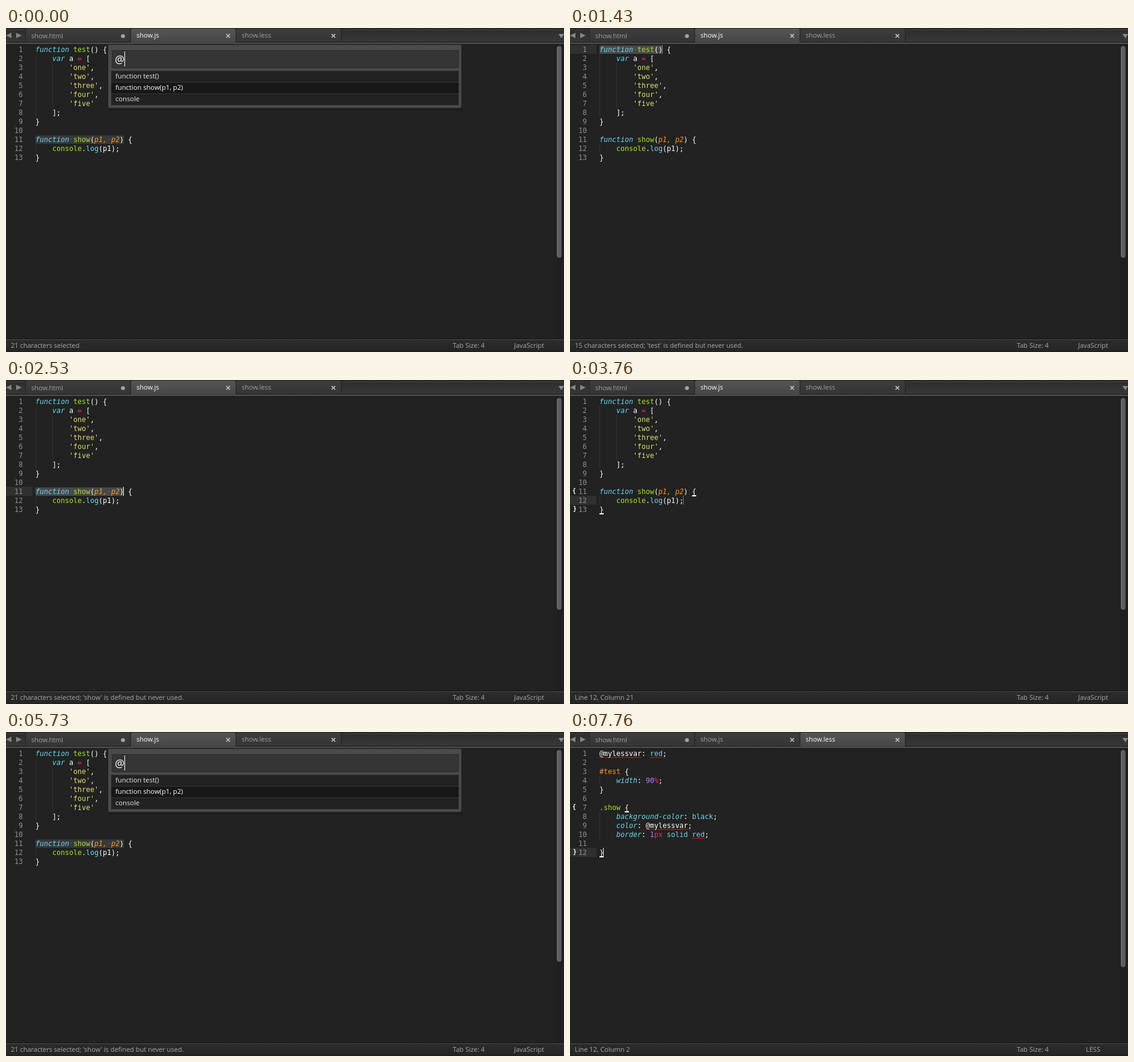
These frames come from a looping animation (928x540 px, 8000 ms). An HTML page:

```html
<!DOCTYPE html>
<html lang="en">
<head>
<meta charset="utf-8">
<title>Go to symbol</title>
<style>
  html, body { margin: 0; width: 100%; height: 100%; overflow: hidden; background: #222; }
  svg { display: block; width: 928px; height: 540px; }
  text { font: 11px "Open Sans", "Noto Sans", sans-serif; white-space: pre; fill: #a8a8a8; }
  text.code { font: 11.63px "DejaVu Sans Mono", "Noto Sans Mono", monospace; }
  text.code.italic { font-style: italic; }
  text.mark { font: bold 10px "DejaVu Sans Mono", "Noto Sans Mono", monospace; fill: #fff; }
  text.symbol { font-size: 11.2px; }
  text.query { font-size: 18px; fill: #fff; }
  rect { shape-rendering: crispEdges; }
  rect[rx] { shape-rendering: auto; }
</style>
</head>
<body>
<svg id="stage" viewBox="0 0 928 540">
  <defs>
    <linearGradient id="bar" x2="0" y2="1"><stop stop-color="#2d2d2d"/><stop offset="1" stop-color="#373737"/></linearGradient>
    <linearGradient id="tab" x2="0" y2="1"><stop stop-color="#3d3d3d"/><stop offset="1" stop-color="#353535"/></linearGradient>
    <linearGradient id="active" x2="0" y2="1"><stop stop-color="#565656"/><stop offset="1" stop-color="#464646"/></linearGradient>
    <linearGradient id="foot" x2="0" y2="1"><stop stop-color="#2c2c2c"/><stop offset="1" stop-color="#252525"/></linearGradient>
    <linearGradient id="thumb"><stop stop-color="#686868"/><stop offset="1" stop-color="#545454"/></linearGradient>
  </defs>
  <g id="scene"></g>
</svg>
<script>
const LOOP = 8000, CHAR = 7, LINE = 15, LEFT = 49, TOP = 28;

// Token prefix "~x" picks a colour; upper case means italic.
const COLORS = { c: '#66d9ef', g: '#a6e22e', p: '#f92672', y: '#e6db74', o: '#fd971f', v: '#ae81ff', w: '#fff' };

const JS_CODE = [
  '~Cfunction| |~gtest|() {',
  '    |~Cvar| a |~p=| [',
  "        |~y'one'|,",
  "        |~y'two'|,",
  "        |~y'three'|,",
  "        |~y'four'|,",
  "        |~y'five'",
  '    ];',
  '}',
  '',
  '~Cfunction| |~gshow|(|~Op1,| |~Op2|) {',
  '    |~gconsole|.|~clog|(p1);',
  '}'
];
const LESS_CODE = [
  '@mylessvar: |~cred|;',
  '',
  '~o#test| {',
  '    |~Cwidth|: |~v90|~p%|;',
  '}',
  '',
  '~g.show| {',
  '    |~Cbackground-color|: |~cblack|;',
  '    |~Ccolor|: @mylessvar;',
  '    |~Cborder|: |~v1|~ppx| |~csolid| |~cred|;',
  '',
  '}'
];

const SYMBOLS = ['function test()', 'function show(p1, p2)', 'console'];
const unused = name => `; '${name}' is defined but never used.`;
const BLOCK = [[10, 22], [12, 0]];

// line and col give the caret; from is where a selection starts.
const PLACES = {
  test: { line: 0, from: 0, col: 15, row: 0, dots: [8], status: '15 characters selected', lint: unused('test') },
  show: { line: 10, from: 0, col: 21, row: 1, dots: [8, 17], status: '21 characters selected', lint: unused('show') },
  console: { line: 11, from: 4, col: 11, row: 2, dots: [], status: '7 characters selected', lint: '', braces: BLOCK },
  end: { line: 11, col: 20, status: 'Line 12, Column 21', lint: '', braces: BLOCK },
  less: { line: 11, col: 1, status: 'Line 12, Column 2', lint: '', braces: [[6, 6], [11, 0]] }
};

// [ms, place, panel open, caret opacity, lint message shown]
const STEPS = [
  [0, 'show', 1, 1, 0], [240, 'show', 1, .7, 0], [365, 'show', 1, .3, 0], [490, 'show', 1, 0, 0],
  [640, 'test', 1, 0, 1], [910, 'test', 1, .35, 1],
  [1030, 'test', 0, 1, 1], [1430, 'test', 0, .4, 1], [1550, 'test', 0, 0, 1],
  [1980, 'test', 1, 1, 0], [2380, 'show', 1, .4, 1],
  [2530, 'show', 0, 1, 1], [2920, 'show', 0, .7, 1], [3040, 'show', 0, .3, 1], [3160, 'show', 0, 0, 1],
  [3310, 'end', 0, 1, 0], [3760, 'end', 0, .4, 0], [3890, 'end', 0, 0, 0], [4320, 'end', 0, .4, 0], [4470, 'end', 0, 1, 0],
  [4600, 'console', 1, 1, 0], [4880, 'show', 1, .7, 1], [5020, 'show', 1, .3, 1],
  [5150, 'console', 1, 0, 0], [5580, 'console', 1, .4, 0],
  [5730, 'show', 1, 1, 1], [6010, 'test', 1, .4, 1], [6130, 'test', 1, 0, 1],
  [6530, 'test', 1, .4, 1], [6650, 'test', 1, 1, 1],
  [6800, 'end', 0, 1, 0], [7200, 'end', 0, .4, 0], [7330, 'end', 0, 0, 0],
  [7760, 'less', 0, 1, 0]
];

const rect = (x, y, w, h, fill, more = '') => `<rect x="${x}" y="${y}" width="${w}" height="${h}" fill="${fill}" ${more}/>`;
const path = (d, fill, more = '') => `<path d="${d}" fill="${fill}" ${more}/>`;
const text = (x, y, s, fill, cls = '', anchor = 'start') =>
  `<text x="${x}" y="${y}" class="${cls}" text-anchor="${anchor}"${fill ? ` style="fill:${fill}"` : ''}>${s}</text>`;
const colX = col => LEFT + col * CHAR;
const lineY = line => TOP + line * LINE;

function codeLine(source, line) {
  let col = 0, out = '';
  for (const token of source.split('|')) {
    const key = token[0] === '~' ? token[1] : 'w';
    const word = token[0] === '~' ? token.slice(2) : token;
    const lead = word.length - word.trimStart().length;
    const italic = key !== key.toLowerCase() ? ' italic' : '';
    if (word.trim())
      out += text(colX(col + lead), lineY(line) + 12, word.trim(), COLORS[key.toLowerCase()], 'code' + italic);
    col += word.length;
  }
  return out;
}

const guide = (col, first, last) =>
  `<path d="M${colX(col) + .5} ${lineY(first)}V${lineY(last + 1)}" stroke="#454545" stroke-dasharray="1 1"/>`;
const underline = (line, col, length) => rect(colX(col), lineY(line) + 14, length * CHAR, 1, '#e01010');

function tabs(activeTab) {
  let out = rect(0, 0, 928, 24, 'url(#bar)') + rect(0, 0, 928, 2, '#252525')
    + rect(0, 2, 928, 1, '#3d3d3d') + rect(0, 23, 928, 1, '#1e1e1e')
    + rect(0, 24, 928, 3, '#464646') + rect(0, 27, 928, 1, '#181818')
    + path('M0 12.5L9 8V17Z', '#858585') + path('M26 12.5L17 8V17Z', '#858585')
    + path('M919 10H928L923.500 17Z', '#8c8c8c');
  ['show.html', 'show.js', 'show.less'].forEach((name, i) => {
    const x = 33 + i * 175, on = i === activeTab, cx = x + 161.5;
    out += path(`M${x} 24V4Q${x} 1 ${x + 3} 1H${x + 171}Q${x + 174} 1 ${x + 174} 4V24Z`, on ? 'url(#active)' : 'url(#tab)')
      + rect(x - 1, 2, 1, 22, '#222') + rect(x + 174, 2, 1, 22, '#222')
      + (on ? '' : rect(x, 23, 174, 1, '#222'))
      + text(x + 9, i ? 16 : 17, name, on ? '#fff' : '#a0a0a0')
      + (i
        ? `<path d="M${cx - 3} 10l6 6m0 -6l-6 6" stroke="#c4c4c4" stroke-width="1.700"/>`
        : `<circle cx="${cx}" cy="13.500" r="3.300" fill="#a2a2a2"/>`);
  });
  return out;
}

function scrollbar(bottom) {
  return rect(912, 28, 16, 491, '#1f1f1f') + rect(912, 28, 1, 491, '#191919') + rect(913, 28, 1, 491, '#292929')
    + rect(916, 30, 8, bottom - 30, 'url(#thumb)', 'rx="4"');
}

function statusBar(message, syntax) {
  return rect(0, 518, 928, 22, 'url(#foot)') + rect(0, 518, 928, 1, '#181818') + rect(0, 519, 928, 1, '#505050')
    + rect(0, 538, 928, 2, '#202020')
    + text(8, 533, message) + text(743, 533, 'Tab Size: 4') + text(870, 533, syntax, '', '', 'middle');
}

function selection({ line, from, col, dots }, open) {
  if (from === undefined) return '';
  return rect(colX(from), lineY(line) + 1, (col - from) * CHAR, 14, open ? '#383838' : '#494949', 'rx="2"')
    + dots.map(dot => rect(colX(dot) + 3, lineY(line) + 7, 1, 1, '#8a8a7a')).join('');
}

function braceMarks(braces = []) {
  return braces.map(([line, col], i) =>
    text(4 + i, lineY(line) + 10, '{}'[i], '', 'mark') + rect(colX(col), lineY(line) + 14, CHAR, 2, '#fff')).join('');
}

function editor(place, open, isLess) {
  const lines = isLess ? LESS_CODE : JS_CODE;
  const active = open ? '' : rect(0, lineY(place.line), 44, LINE, '#303030');
  const guides = isLess ? guide(0, 3, 3) + guide(0, 7, 9) : guide(0, 1, 7) + guide(4, 2, 6) + guide(0, 11, 11);
  const underlines = isLess
    ? underline(0, 0, 10) + underline(0, 12, 3) + underline(8, 11, 10) + underline(9, 22, 3)
    : '';
  return active + guides + selection(place, open) + underlines + lines.map((source, i) =>
    text(28, lineY(i) + 12, i + 1, '#8f908a', 'code', 'end') + codeLine(source, i)).join('') + braceMarks(place.braces);
}

function panel(selected) {
  const body = 'M170 28H758V131Q758 134 755 134H173Q170 134 170 131Z';
  return path(body, '#151515', 'transform="translate(1 4)" opacity=".35"') + path(body, '#2c2c2c')
    + path('M170 28H757V130Q757 133 754 133H173Q170 133 170 130Z', '#4a4a4a')
    + rect(176, 37, 577, 30, '#2a2a2a') + rect(177, 38, 575, 28, '#353535')
    + text(181, 59, '@', '', 'query')
    + rect(175, 71, 578, 58, '#343434')
    + SYMBOLS.map((name, i) => {
      const on = i === selected;
      return rect(175, 72 + i * 19, 578, 18, on ? '#171717' : '#222')
        + text(182, 84 + i * 19, name, on ? '#fff' : '#e8e8e8', 'symbol');
    }).join('');
}

function draw([, name, open, caret, lint]) {
  const place = PLACES[name], isLess = name === 'less';
  const caretBar = open
    ? rect(197, 39, 1, 25, '#fff', `opacity="${caret}"`)
    : rect(colX(place.col) - 1, lineY(place.line), 1, LINE, '#f8f8f0', `opacity="${caret}"`);
  return rect(0, 0, 928, 540, '#222') + editor(place, open, isLess) + scrollbar(isLess ? 392 : 383)
    + tabs(isLess ? 2 : 1) + statusBar(place.status + (lint ? place.lint : ''), isLess ? 'LESS' : 'JavaScript')
    + (open ? panel(place.row) : '') + caretBar;
}

const scene = document.getElementById('scene');
const start = performance.now();
let shown;
function tick() {
  const time = (performance.now() - start) % LOOP;
  const step = STEPS.findLast(([at]) => at <= time);
  if (step !== shown) scene.innerHTML = draw(shown = step);
  requestAnimationFrame(tick);
}
tick();
</script>
</body>
</html>
```
